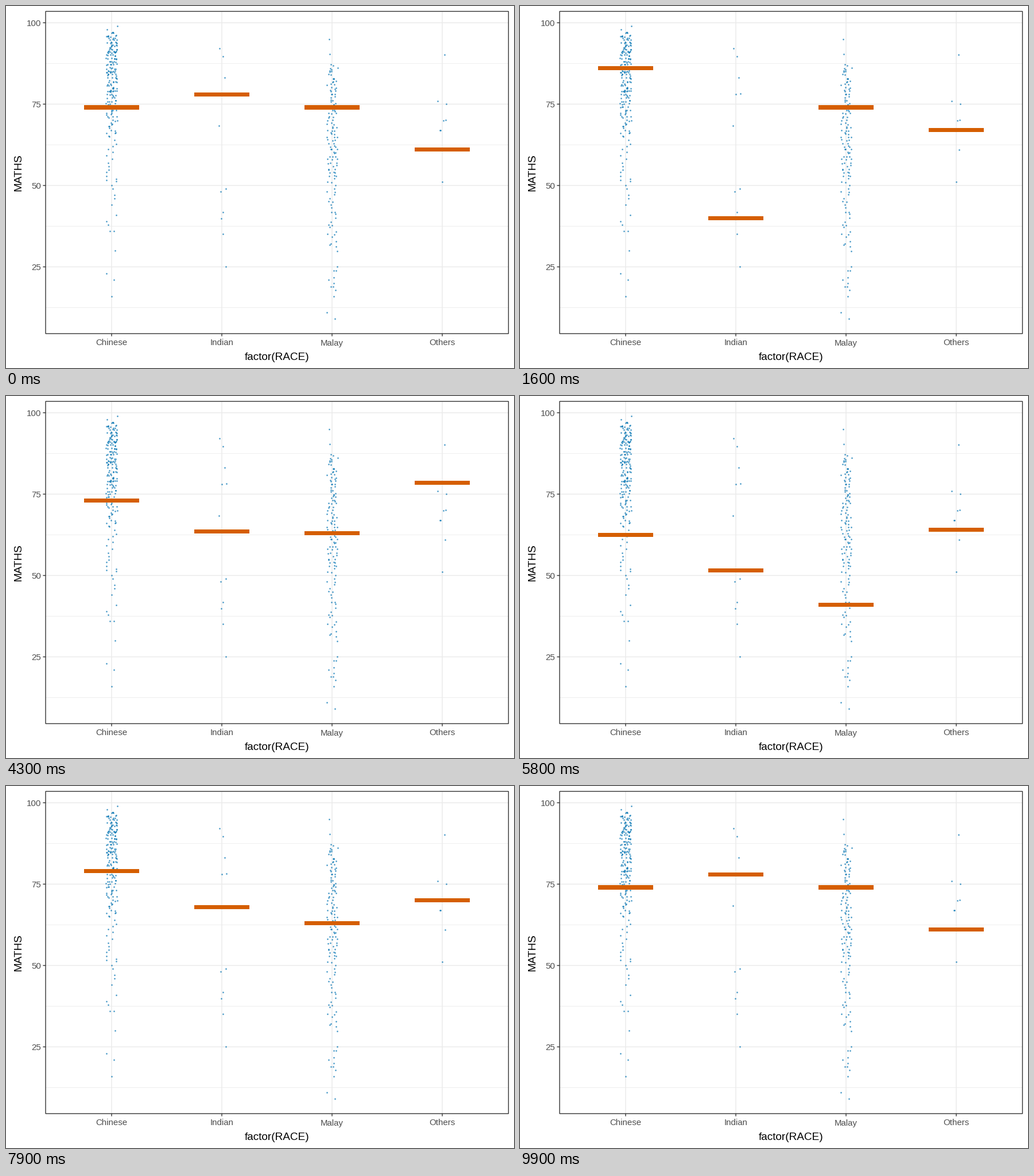
Write a matplotlib script that moves like this. It is 885 px wide and 632 px high and loops after 10 s.

```python
import numpy as np
import matplotlib.pyplot as plt
from matplotlib.animation import FuncAnimation
from matplotlib.patches import Rectangle

W, H, DPI = 885, 632, 100
PT = 72 / DPI                      # points per pixel
LEFT, RIGHT, TOP, BOTTOM = 69.0, 875.4, 9.4, 572.0
GROUPS = ["Chinese", "Indian", "Malay", "Others"]
CENTERS = 184 + 192 * np.arange(4)
BAR_W, BAR_H = 96, 7.1
JITTER = 9.6
GRID, INK = "#ebebeb", "#333333"

plt.rcParams["font.family"] = "Liberation Sans"


def y_px(score):
    return 29.3 + (100 - np.asarray(score, float)) * 5.682


# One sampled score per group and draw
DRAWS = {
    "Chinese": [74, 80, 73, 85, 86, 77, 82, 74, 85, 90, 71, 75, 68,
                91, 65, 60, 75, 68, 74, 93, 79, 95, 78, 71, 71],
    "Indian": [78, 83, 68, 78, 40, 68, 42, 78, 48, 78, 92, 35, 25,
               48, 35, 68, 25, 78, 35, 42, 68, 48, 35, 42, 49],
    "Malay": [74, 32, 66, 63, 74, 58, 19, 63, 30, 75, 79, 47, 66,
              58, 9, 73, 57, 62, 40, 19, 63, 16, 40, 11, 65],
    "Others": [61, 67, 61, 70, 67, 67, 90, 70, 67, 67, 67, 90, 70,
               76, 67, 61, 51, 51, 76, 67, 70, 61, 76, 70, 90],
}

# Isolated points as (offset from the group centre in px, score)
SPARSE = {
    "Chinese": [(10, 99), (-8, 98), (8, 52), (2, 49), (5, 47), (5, 46),
                (0, 44), (8, 41), (-9, 39), (-6, 38), (-3, 36), (4, 36),
                (6, 30), (-9, 23), (4, 21), (0, 16)],
    "Indian": [(-4.5, 92.2), (1.5, 89.7), (5, 83.1), (7.5, 78.3), (0, 78),
               (-5, 68.3), (7, 49.1), (-2, 48.1), (2, 41.8), (-1, 39.8),
               (2, 35.1), (7, 25)],
    "Malay": [(-5, 95), (-4, 90.3), (9, 25), (3, 23.8), (7, 23.8), (3, 21.8),
              (-6, 21), (3, 20), (2, 19), (-2, 18.9), (6, 17.9), (3, 16),
              (-9, 11), (4.5, 9)],
    "Others": [(4, 90.2), (-8.5, 76), (7, 75.1), (6, 70.2), (1.5, 70),
               (-4, 67), (-3.5, 66.9), (4.5, 61), (0, 51.2)],
}

# Crowded parts: whole scores spread by a rule, then jittered
DENSE = {
    "Chinese": np.concatenate([62 + 35 * np.linspace(0, 1, 168) ** 0.65,
                               np.repeat([79, 85, 91], 5),
                               np.linspace(50, 61, 12)]),
    "Malay": np.concatenate([np.linspace(53, 87, 98),
                             np.linspace(30, 53, 31)]),
}


def dot_positions():
    rng = np.random.default_rng(7)
    xs, ys = [], []
    for center, name in zip(CENTERS, GROUPS):
        offsets, scores = np.array(SPARSE[name]).T
        crowd = np.round(DENSE.get(name, np.empty(0)))
        xs += [center + offsets,
               center + rng.uniform(-JITTER, JITTER, len(crowd))]
        ys += [y_px(scores),
               y_px(crowd + rng.uniform(-0.3, 0.3, len(crowd)))]
    return np.concatenate(xs), np.concatenate(ys)


fig = plt.figure(figsize=(W / DPI, H / DPI), dpi=DPI, facecolor="white")
ax = fig.add_axes([0, 0, 1, 1])
ax.set_xlim(0, W)
ax.set_ylim(H, 0)
ax.axis("off")


def line(x, y, width, color, z):
    ax.plot(x, y, color=color, lw=width * PT, zorder=z, snap=False,
            solid_capstyle="butt")


def label(x, y, text, size, color="black", **kw):
    ax.text(x, y, text, fontsize=size * PT, color=color, va="baseline", **kw)


for score in np.arange(12.5, 100, 25):
    line([LEFT, RIGHT], [y_px(score)] * 2, 0.8, GRID, 1)
for score in range(25, 101, 25):
    y = float(y_px(score))
    line([LEFT, RIGHT], [y, y], 1.5, GRID, 1)
    line([LEFT - 4.6, LEFT], [y, y], 1.4, INK, 5)
    label(61, y + 5.6, str(score), 15, "#4d4d4d", ha="right")
for x, name in zip(CENTERS, GROUPS):
    line([x, x], [TOP, BOTTOM], 1.5, GRID, 1)
    line([x, x], [BOTTOM, BOTTOM + 4.6], 1.4, INK, 5)
    label(x, 592.5, name, 15, "#4d4d4d", ha="center")

label(472, 618, "factor(RACE)", 19, ha="center")
label(26, 291, "MATHS", 19, ha="center", rotation=90, rotation_mode="anchor")

ax.scatter(*dot_positions(), s=(2.7 * PT) ** 2, c="#0072b2", alpha=0.7,
           linewidths=0, zorder=2)

bars = [ax.add_patch(Rectangle((x - BAR_W / 2, 0), BAR_W, BAR_H, lw=0,
                               fc="#d55e00", zorder=3)) for x in CENTERS]
ax.add_patch(Rectangle((LEFT, TOP), RIGHT - LEFT, BOTTOM - TOP, fill=False,
                       ec=INK, lw=1.4 * PT, zorder=4, snap=False))

# Each draw holds, passes through one halfway step, then the next one holds
FRAMES = 100
starts = np.array([4 * k - (k > 12) for k in range(26)])
ends = np.append(starts[1:] - 2, FRAMES)
key_times = np.column_stack([starts, ends]).ravel()
key_scores = [np.repeat(DRAWS[g] + DRAWS[g][:1], 2) for g in GROUPS]


def update(frame):
    for bar, scores in zip(bars, key_scores):
        bar.set_y(y_px(np.interp(frame, key_times, scores)) - BAR_H / 2)
    return bars


anim = FuncAnimation(fig, update, frames=FRAMES, interval=100, repeat=True,
                     repeat_delay=0, blit=False)
plt.show()
```
